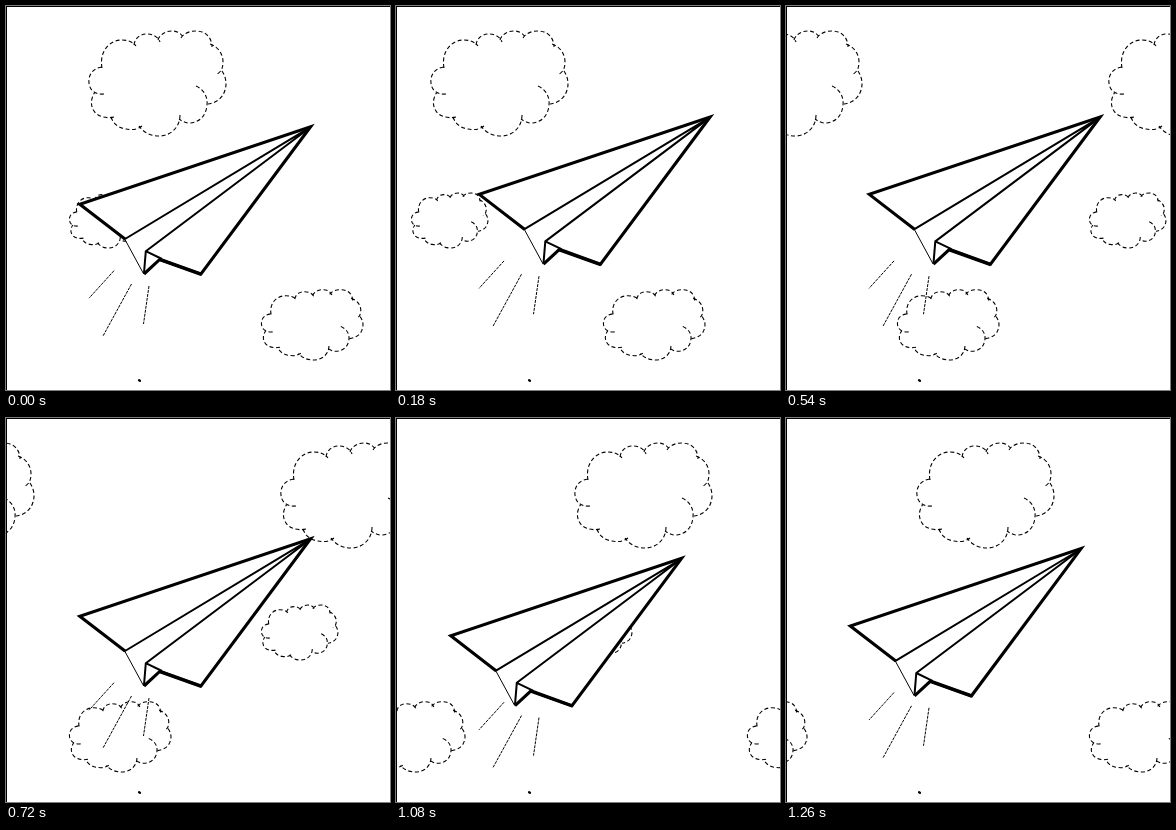
Recreate the animation shown at these times as an HTML page. Size 384 by 384 pixels, loop 1.44 s.

```html
<!DOCTYPE html>
<html lang="en">
<head>
<meta charset="utf-8">
<title>Paper plane</title>
<style>
  html, body { margin: 0; width: 100%; height: 100%; overflow: hidden; background: #fff; }
  svg { display: block; width: 100vw; height: 100vh; }
  path { fill: none; stroke: #000; }
  .cloud { stroke-width: 1.1; stroke-dasharray: 4 2.6; vector-effect: non-scaling-stroke; }
  #trail path { stroke-width: 1; stroke-dasharray: 3 1; }
  #plane .paper { fill: #fff; stroke: none; }
  #plane .edge { stroke-width: 3.1; }
  #plane .fold { stroke-width: 2; }
  #plane .thin { stroke-width: 1; }
</style>
</head>
<body>
<svg viewBox="0 0 384 384">
  <defs>
    <path id="puff" class="cloud" d="
      M15 64C4 65 -1 58 0 49C1 42 6 38 13 37
      M13 38C10 22 20 10 33 10C39 10 44 12 47 16
      M45 15C46 8 51 4 58 4C64 4 69 7 71 12
      M69 10C71 4 77 1 83 1C89 1 93 4 95 9
      M92 8C95 3 101 1 107 1C117 1 123 8 123 17
      M121 14C130 17 134 25 134 32C134 38 132 42 128 44
      M133 41C137 47 138 54 136 60C134 68 127 73 119 74
      M107 56C114 59 119 66 118 75C117 87 109 93 100 93C96 93 93 91 90 89
      M91 85C91 97 82 106 70 106C61 106 54 102 50 96
      M53 96C48 100 42 100 37 99C29 98 24 93 22 87
      M25 87C16 89 8 86 5 81C1 75 2 68 6 62"/>
  </defs>
  <g id="sky"></g>
  <g id="plane">
    <path class="paper" d="M304.6 120.8L74 198L119 233L138 268L154 253L195 268Z"/>
    <path class="thin" d="M118.7 233L137.7 268"/>
    <path class="fold" d="M119 233L304.5 121.2L139.8 245.2L138 267M139.8 245.2L156 253"/>
    <path class="edge" d="M119.3 233.3L73.8 198.2L304.6 120.8L195 268L154 253.2L138 268"/>
    <path class="edge" d="M154 253.8L195.3 268.5"/>
  </g>
  <g id="trail">
    <path d="M108 264.7L83 292.2"/>
    <path d="M125.5 278L97 330"/>
    <path d="M143 280L137.5 318"/>
  </g>
  <ellipse cx="133.5" cy="374.5" rx="1.7" ry="1.3" transform="rotate(35 133.5 374.5)"/>
  <path d="M0 .5H384M.5 0V384"/>
</svg>
<script>
  const SIZE = 384, LOOP = 1440, STEPS = 8, SWAY = 9.5, LIFT = 9.8;
  const $ = id => document.getElementById(id);
  const sky = $('sky'), plane = $('plane'), trail = $('trail');

  // x, y, horizontal and vertical scale
  const clouds = [
    [83, 24, 1, 1],
    [255.5, 283, .741, .67],
    [63.5, 186.5, .558, .524]
  ];

  function addCloud(x, y, sx, sy) {
    const puff = $('puff').cloneNode();
    puff.removeAttribute('id');
    puff.setAttribute('transform', `translate(${x} ${y}) scale(${sx} ${sy})`);
    sky.append(puff);
  }

  // A second set one stage to the right makes the drift wrap
  for (const [x, ...rest] of clouds) {
    addCloud(x, ...rest);
    addCloud(x + SIZE, ...rest);
  }

  const move = (el, x, y) => el.setAttribute('transform', `translate(${x} ${y})`);

  // Triangle wave: 0 1 2 1 0 -1 -2 -1
  const bob = n => 2 - Math.abs((n + 2) % STEPS - 4);

  function draw(time) {
    const step = Math.floor(time % LOOP / LOOP * STEPS);
    const rise = bob(step);
    move(sky, -step * SIZE / STEPS, 0);
    move(plane, rise * SWAY, -rise * LIFT);
    move(trail, 0, -rise * LIFT);
  }

  const start = performance.now();
  function tick() {
    draw(performance.now() - start);
    requestAnimationFrame(tick);
  }
  tick();
</script>
</body>
</html>
```
